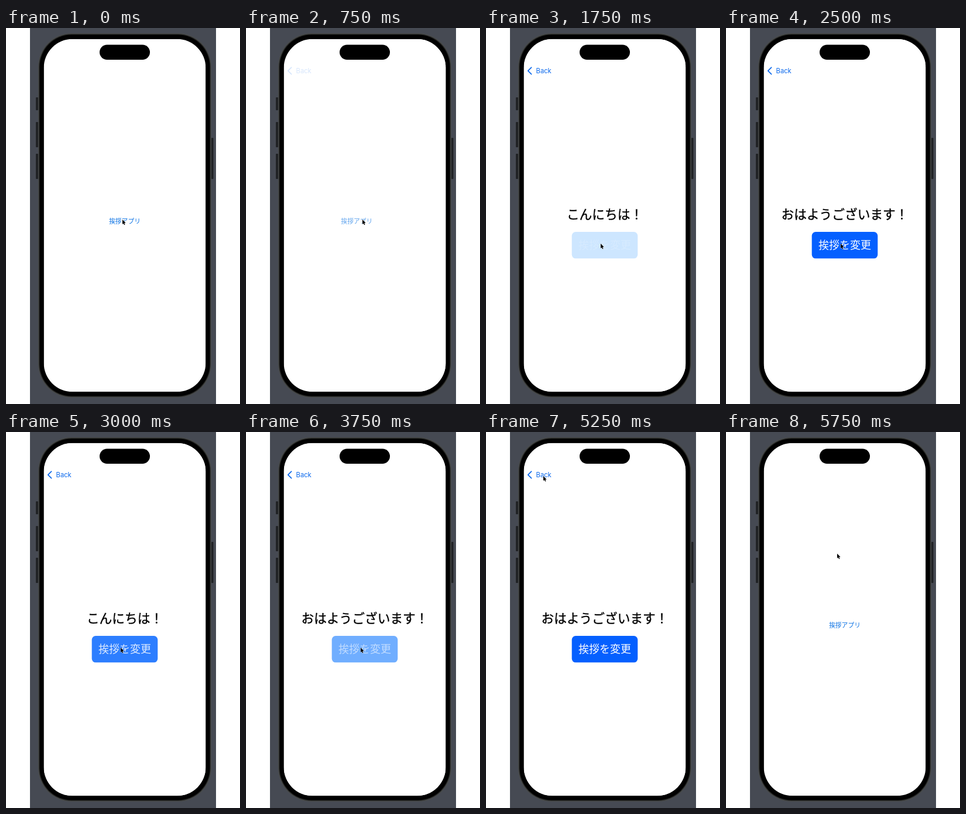
An HTML page with a canvas that plays this animation: 400 by 640 pixels, repeating every 6 s.

```html
<!DOCTYPE html>
<html lang="ja">
<head>
<meta charset="utf-8">
<title>挨拶アプリ</title>
<style>
  html, body { margin: 0; width: 100%; height: 100%; overflow: hidden; background: #fff; }
  canvas { display: block; width: 400px; height: 640px; }
</style>
</head>
<body>
<canvas id="stage" width="400" height="640"></canvas>
<script>
const ctx = document.getElementById('stage').getContext('2d');
const LOOP = 6000, STEP = 250;
const CENTER = 203;
const SCREEN = { x: 64.6, y: 18.8, w: 276.8, h: 600.5 };
const JP = '"Noto Sans CJK JP", "Noto Sans CJK", sans-serif';

// Moments at which the mouse button is let go, and the page slides.
const LINK_TAPS = [580];
const BUTTON_TAPS = [1850, 2760, 3612];
const PUSH_AT = 660, POP_AT = 5300, SLIDE = 350;
const HOLD = 100, FADE = 300, PRESSED = .2;

const CURSOR_START = { x: 199, y: 326 };
const CURSOR_MOVES = [
  { at: 950, time: 500, x: 196, y: 367 },
  { at: 4000, time: 550, x: 98, y: 75 },
  { at: 5400, time: 350, x: 190, y: 207 },
];

function ease(t, start, duration) {
  const k = Math.min(1, Math.max(0, (t - start) / duration));
  return k * k * (3 - 2 * k);
}

// A pressed control dims at once and fades back after release.
function tapAlpha(taps, t) {
  const release = taps.findLast(tap => t >= tap - HOLD);
  if (release === undefined) return 1;
  return Math.min(1, PRESSED + (1 - PRESSED) * Math.max(0, t - release) / FADE);
}

function cursorAt(t) {
  let { x, y } = CURSOR_START;
  for (const move of CURSOR_MOVES) {
    const k = ease(t, move.at, move.time);
    x += (move.x - x) * k;
    y += (move.y - y) * k;
  }
  return [x, y];
}

function box(x, y, w, h, r, fill) {
  ctx.beginPath();
  ctx.roundRect(x, y, w, h, r);
  ctx.fillStyle = fill;
  ctx.fill();
}

function label(text, x, y, font, color, align = 'center') {
  ctx.font = font;
  ctx.textAlign = align;
  ctx.fillStyle = color;
  ctx.fillText(text, x, y);
}

function fillScreen() {
  ctx.fillStyle = '#fff';
  ctx.fillRect(SCREEN.x, SCREEN.y, SCREEN.w, SCREEN.h);
}

function drawBody() {
  ctx.fillStyle = '#fff';
  ctx.fillRect(0, 0, 400, 640);
  ctx.fillStyle = '#464a53';
  ctx.fillRect(41, 0, 318, 640);
  box(51, 118, 4, 22, 1, '#202225');
  box(51, 160, 4, 43, 1, '#202225');
  box(51, 214, 4, 43, 1, '#202225');
  box(351, 187, 3.5, 70, 1, '#202225');
  ['#484a49', '#222322', '#000'].forEach((color, i) => {
    const inset = i * 1.3;
    box(55 + inset, 9 + inset, 296 - 2 * inset, 620 - 2 * inset, 57 - inset, color);
  });
}

function drawHome(t, push) {
  fillScreen();
  ctx.globalAlpha = tapAlpha(LINK_TAPS, t);
  label('挨拶アプリ', CENTER - push * SCREEN.w * .3, 332.8, `10.8px ${JP}`, '#0b72e4');
  ctx.globalAlpha = 1;
}

function drawGreeting(t, push) {
  const morning = BUTTON_TAPS.filter(tap => t >= tap).length % 2 === 1;
  const greeting = morning ? 'おはようございます！' : 'こんにちは！';
  const alpha = tapAlpha(BUTTON_TAPS, t);
  ctx.save();
  ctx.translate(SCREEN.w * (1 - push), 0);
  fillScreen();
  label(greeting, CENTER, 324.6, `21.7px ${JP}`, '#000');
  ctx.strokeStyle = '#000';
  ctx.lineWidth = .35;
  ctx.strokeText(greeting, CENTER, 324.6);
  box(146.7, 347, 112.6, 45.3, 6.5, `rgba(5,${136 - 40 * alpha},255,${alpha})`);
  label('挨拶を変更', CENTER, 376.4, `300 18px ${JP}`, `rgba(255,255,255,${alpha})`);
  ctx.restore();
}

function drawBack(alpha) {
  ctx.globalAlpha = alpha;
  ctx.beginPath();
  ctx.moveTo(77.6, 67.2);
  ctx.lineTo(71.8, 72.9);
  ctx.lineTo(77.6, 78.6);
  ctx.strokeStyle = '#0b68ec';
  ctx.lineWidth = 1.7;
  ctx.lineCap = ctx.lineJoin = 'round';
  ctx.stroke();
  label('Back', 85.6, 77, '11.2px Inter, sans-serif', '#0b68ec', 'left');
  ctx.globalAlpha = 1;
}

function drawCursor(x, y) {
  ctx.save();
  ctx.translate(x, y);
  const arrow = new Path2D('M0 0V8L1.8 6.4 3.1 9.3 4.5 8.7 3.2 5.9 5.6 5.7Z');
  ctx.strokeStyle = 'rgba(255,255,255,.7)';
  ctx.lineWidth = 1;
  ctx.stroke(arrow);
  ctx.fillStyle = '#000';
  ctx.fill(arrow);
  ctx.restore();
}

function draw(t) {
  const push = ease(t, PUSH_AT, SLIDE) - ease(t, POP_AT, SLIDE);
  drawBody();
  ctx.save();
  ctx.beginPath();
  ctx.roundRect(SCREEN.x, SCREEN.y, SCREEN.w, SCREEN.h, 49);
  ctx.clip();
  drawHome(t, push);
  if (push > 0) {
    drawGreeting(t, push);
    drawBack(push);
  }
  ctx.restore();
  box(160, 28.5, 86, 25.5, 12.75, '#000');
  drawCursor(...cursorAt(t));
}

function frame() {
  const t = performance.now() % LOOP;
  draw(Math.floor(t / STEP) * STEP);
  requestAnimationFrame(frame);
}
frame();
</script>
</body>
</html>
```
